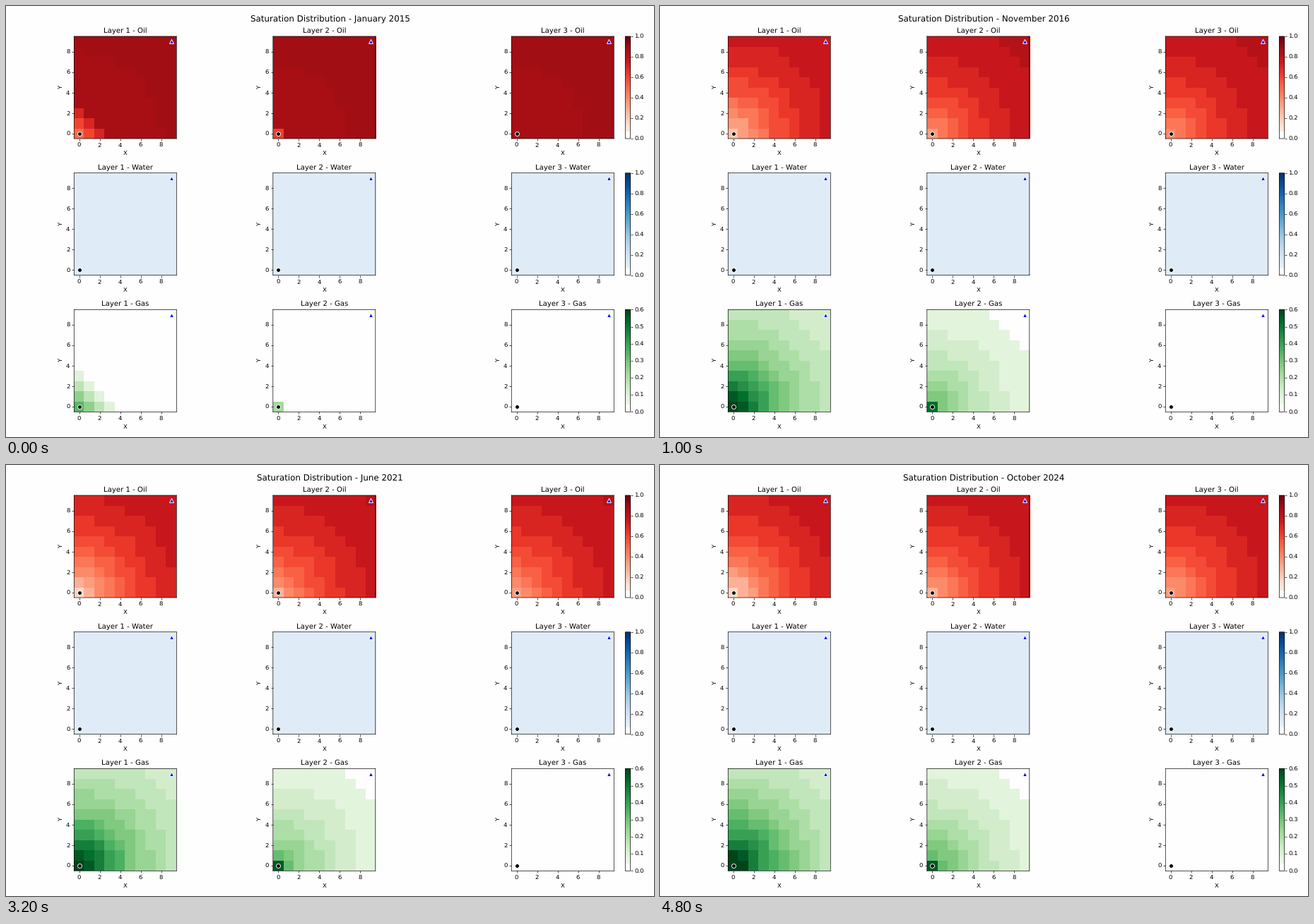
Write a matplotlib script that moves like this. It is 917x611 px and loops after 5 s.

```python
import numpy as np
import matplotlib.pyplot as plt
from matplotlib.animation import FuncAnimation
from matplotlib.colors import ListedColormap

W, H, DPI = 917, 611, 64
K = 917 / 15 / DPI  # sizes are those of a 15-inch-wide figure
FRAMES, INTERVAL = 25, 200
SIDE = 145
LEFTS = (96.3, 377.8, 715.3)
TOPS = (43, 236.7, 430.4)
PHASES = (("Oil", "Reds", 1.0, 0.2), ("Water", "Blues", 1.0, 0.2), ("Gas", "Greens", 0.6, 0.1))
MONTHS = ("January February March April May June July August "
          "September October November December").split()

plt.rcParams.update({
    "font.family": "DejaVu Sans", "font.size": 10 * K, "text.hinting": "none",
    "axes.linewidth": 0.8 * K, "axes.titlepad": 6 * K, "axes.labelpad": 4 * K,
    "xtick.major.size": 3.5 * K, "ytick.major.size": 3.5 * K,
    "xtick.major.width": 0.8 * K, "ytick.major.width": 0.8 * K,
    "xtick.major.pad": 3.5 * K, "ytick.major.pad": 3.5 * K,
})

gx, gy = np.meshgrid(np.arange(10), np.arange(10))
dist = np.hypot(gx, gy)
steps = gx + gy
well = np.exp(-3 * dist)
WATER = np.full((10, 10), 0.12)
DRY = np.zeros((10, 10))

# (amplitude, reach, far level) of the decay around the injector: early, settled, late
OIL_TOP = (-0.56, 4, 0.83), (-0.635, 5, 0.835), (-0.70, 5.15, 0.84)
OIL_DEEP = (-0.40, 4.4, 0.83), (-0.49, 5.3, 0.85), (-0.54, 5.8, 0.847)
GAS_TOP = (0.62, 4, 0.055), (0.605, 5, 0.066), (0.63, 5.15, 0.068)
GAS_MID = (0.273, 8.5, -0.04), (0.335, 6.02, 0), (0.373, 6.18, 0)


def band(values, step, top):
    return np.clip(top - step * np.round((top - values) / step), 0, top)


def virgin_oil(radius):
    return np.where(dist > radius, 0.88, 0.865)


def first_state():
    oil_top = np.where(steps <= 2, 0.5 + 0.1 * steps, virgin_oil(8))
    oil_mid = np.where(steps == 0, 0.62, virgin_oil(6.5))
    gas_top = np.maximum(0, 0.34 - 0.085 * steps)
    gas_mid = np.where(steps == 0, 0.22, 0)
    return (oil_top, oil_mid, virgin_oil(6.5)), (gas_top, gas_mid, DRY)


def state(n):
    if n == 0:
        return first_state()
    settle = 1 - 0.4 ** (n - 1)
    late = (max(0, n - 11) / 13) ** 0.5

    def field(keys):
        early, settled, final = (a * np.exp(-dist / reach) + far for a, reach, far in keys)
        return early + settle * (settled - early) + late * (final - settled)

    oil_deep = field(OIL_DEEP)
    oil = field(OIL_TOP), oil_deep - 0.05 * well, oil_deep + 0.04 * well
    gas = field(GAS_TOP), field(GAS_MID) + 0.2 * well, DRY
    return [band(f, 0.06, 0.88) for f in oil], [band(f, 0.04, 0.6) for f in gas]


def date_label(n):
    month = 3 * n if n < 2 else 5 * n - 3
    return f"{MONTHS[month % 12]} {2015 + month // 12}"


def palette(name):
    colors = plt.get_cmap(name)(np.linspace(0, 1, 256))
    colors[:18, :3] = 254 / 255
    return ListedColormap(colors)


def pixel_axes(left, top, width, height):
    ax = fig.add_axes([left / W, 1 - (top + height) / H, width / W, height / H])
    for spine in ax.spines.values():
        spine.set_snap(False)
    return ax


fig = plt.figure(figsize=(W / DPI, H / DPI), dpi=DPI, facecolor="#fefefe")
heading = fig.suptitle("", fontsize=14 * K)
images = {}

for (phase, cmap_name, vmax, step), top in zip(PHASES, TOPS):
    cmap = palette(cmap_name)
    for layer, left in enumerate(LEFTS):
        ax = pixel_axes(left, top, SIDE, SIDE)
        image = ax.imshow(WATER, cmap=cmap, vmin=0, vmax=vmax, origin="lower",
                          interpolation="nearest", aspect="auto")
        images[phase, layer] = image
        for cell, marker, color in ((0, "o", "black"), (9, "^", "blue")):
            ax.scatter(cell, cell, s=48 * K * K, marker=marker, c=color,
                       edgecolors="white", linewidths=1.1 * K, zorder=3, snap=False)
        ax.set(xlim=(-0.5, 9.5), ylim=(-0.5, 9.5), xlabel="X", ylabel="Y",
               xticks=range(0, 10, 2), yticks=range(0, 10, 2))
        ax.set_title(f"Layer {layer + 1} - {phase}", fontsize=12 * K)
    bar = fig.colorbar(image, cax=pixel_axes(876.3, top, 7.25, SIDE))
    bar.set_ticks(np.arange(0, vmax + step / 2, step))
    bar.ax.yaxis.set_major_formatter("{x:.1f}")
    bar.outline.set_snap(False)


def draw(n):
    oil, gas = state(n)
    for layer in range(3):
        images["Oil", layer].set_data(oil[layer])
        images["Gas", layer].set_data(gas[layer])
    heading.set_text(f"Saturation Distribution - {date_label(n)}")
    return [heading, *images.values()]


anim = FuncAnimation(fig, draw, frames=FRAMES, interval=INTERVAL, repeat=True,
                     repeat_delay=0, blit=False)
plt.show()
```
